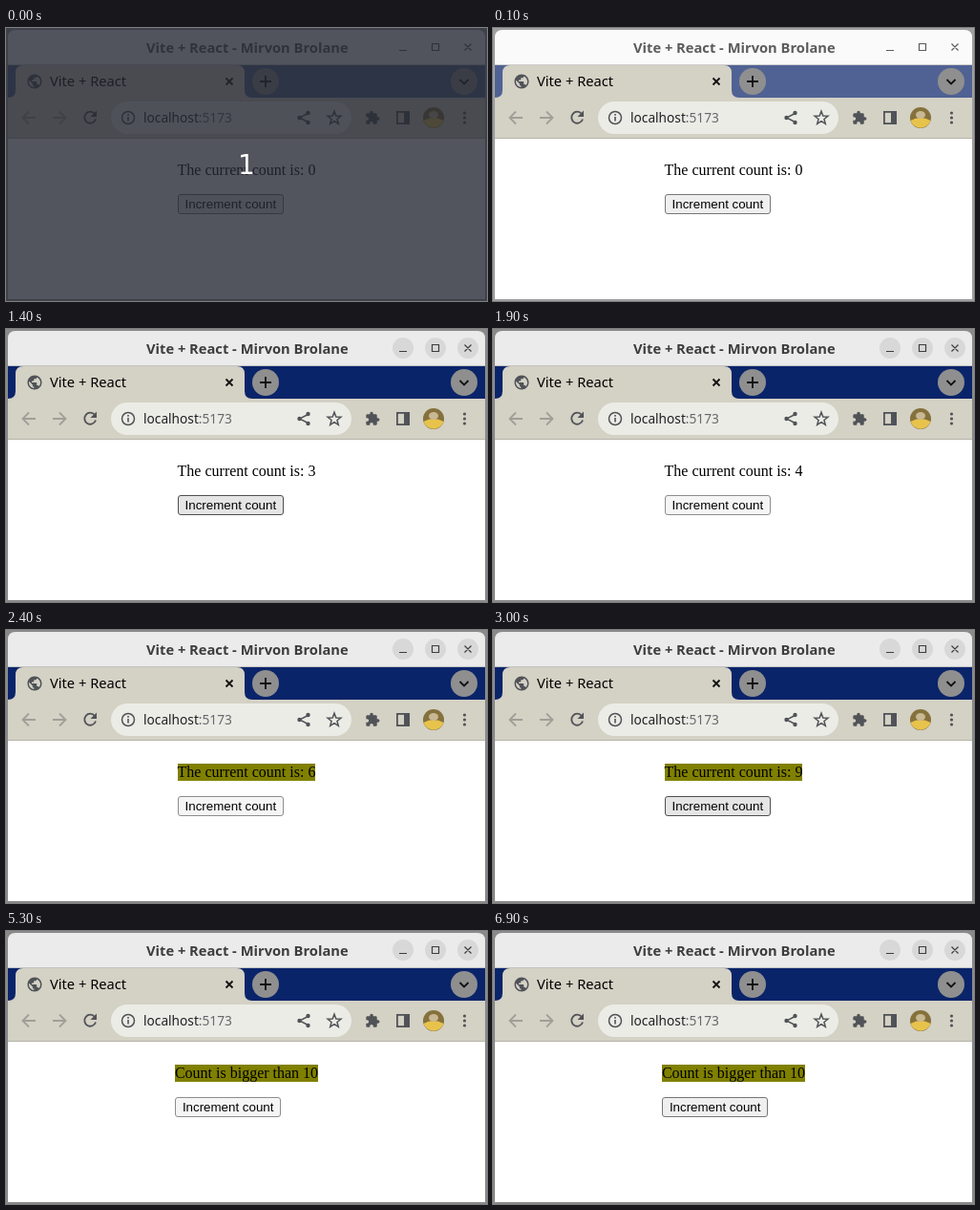
An HTML page that plays this animation: 504 px wide and 286 px high, repeating every 7500 ms.

```html
<!DOCTYPE html>
<html lang="en">
<head>
<meta charset="utf-8">
<title>Counter</title>
<style>
html, body { margin: 0; width: 100%; height: 100%; overflow: hidden; }
#stage { position: relative; width: 504px; height: 286px; overflow: hidden; background: var(--edge); }
svg { position: absolute; inset: 0; }
.ui { font-family: "Noto Sans", "Open Sans", sans-serif; }
.line { fill: none; stroke: #505357; stroke-width: 1.8; }
.ink { fill: #505357; }
.faint { stroke: #a09f98; }
.black { stroke: #111; }
#bar { fill: var(--bar); }
#title { fill: var(--title); font-weight: 700; font-size: 14.7px; }
#discs { fill: #d8d8d8; opacity: var(--focus); }
#marks { fill: none; stroke: var(--title); stroke-width: 1.2; }
#strip { fill: var(--strip); }
#page { position: absolute; left: 2px; top: 140px; width: 500px; display: flex; justify-content: center; }
#msg { margin: 0 0 16px; font: 16px/18px "Liberation Serif", "Times New Roman", serif; color: #000; white-space: nowrap; }
#msg.high { background: #808000; }
#btn { box-sizing: border-box; height: 21px; padding: 2px 7px; border: 1px solid #767676; border-radius: 3px;
  background: #efefef; color: #000; font: 13.333px/15px "Liberation Sans", Arial, sans-serif; white-space: nowrap;
  display: inline-block; }
#btn.hover { background: #e5e5e5; border-color: #4f4f4f; }
#btn.down { background: #f5f5f5; border-color: #8d8d8d; }
#shade { position: absolute; inset: 0; background: rgba(36, 40, 50, .79); color: #fff; text-align: center;
  font: 28px/32px "DejaVu Sans", sans-serif; padding-top: 128px; }
</style>
</head>
<body>
<div id="stage">
  <svg class="ui" width="504" height="286" viewBox="0 0 504 286">
    <path id="bar" d="M2 39V10Q2 2 10 2H494Q502 2 502 10V39Z"/>
    <text id="title" x="147" y="25.5">Vite + React - Mirvon Brolane</text>
    <g id="discs"><circle cx="416" cy="20" r="11"/><circle cx="450" cy="20" r="11"/><circle cx="484" cy="20" r="11"/></g>
    <path id="marks" d="M412 23.5H420M446.500 16.500H453.500V23.500H446.500ZM480.500 16.500L487.500 23.500M487.500 16.500L480.500 23.500"/>

    <rect id="strip" x="2" y="39" width="500" height="34"/>
    <path d="M2 38.500H502" stroke="#000" stroke-opacity=".18"/>
    <path fill="#d4d1c5" d="M2 73Q10 73 10 65V47Q10 39 18 39H242Q250 39 250 47V65Q250 73 258 73H502V116H2Z"/>
    <path d="M2 115.500H502" stroke="#b6b4aa"/>
    <path class="ink" transform="translate(21 47) scale(.75)" d="M12 2C6.480 2 2 6.480 2 12s4.480 10 10 10 10-4.480 10-10S17.520 2 12 2zm-1 17.930c-3.950-.490-7-3.850-7-7.930 0-.620.080-1.210.210-1.790L9 15v1c0 1.100.900 2 2 2v1.930zm6.900-2.540c-.260-.810-1-1.390-1.900-1.390h-1v-3c0-.550-.450-1-1-1H8v-2h2c.550 0 1-.450 1-1V7h2c1.100 0 2-.900 2-2v-.410c2.930 1.190 5 4.060 5 7.410 0 2.080-.800 3.970-2.100 5.390z"/>
    <text x="46" y="61" font-size="14.67">Vite + React</text>
    <path class="line black" d="M230.500 52.500L237.500 59.500M237.500 52.500L230.500 59.500"/>
    <g fill="#8f8f8f"><circle cx="272" cy="56" r="14"/><circle cx="480" cy="56" r="14"/></g>
    <path class="line black" d="M266 56H278M272 50V62M475.500 54L480 58.500L484.500 54"/>

    <path class="line faint" d="M31 94H18M24 87.500L17.500 94L24 100.500M49 94H62M56 87.500L62.500 94L56 100.500"/>
    <path class="line" d="M93 90A6 6 0 1 0 94 95.500"/>
    <path class="ink" d="M95 86.500V93H88.500Z"/>
    <rect x="110" y="77" width="252" height="34" rx="17" fill="#ecece6"/>
    <circle class="line" cx="128" cy="94" r="6.500" style="stroke-width:1.500"/>
    <path class="line" d="M128 93V97.500M128 90V91.700" style="stroke-width:1.600"/>
    <text x="144" y="99" font-size="13.7" fill="#202124">localhost<tspan fill="#65686c">:5173</tspan></text>
    <path class="line" d="M316.500 89.500L307.500 94L316.500 98.500" style="stroke-width:1.400"/>
    <g class="ink"><circle cx="316.500" cy="89" r="2.200"/><circle cx="307.500" cy="94" r="2.200"/><circle cx="316.500" cy="99" r="2.200"/></g>
    <path id="star" class="line" style="stroke-width:1.500"/>
    <path class="ink" transform="translate(376 86) scale(.67)" d="M20.500 11H19V7c0-1.100-.900-2-2-2h-4V3.500C13 2.120 11.880 1 10.500 1S8 2.120 8 3.500V5H4c-1.100 0-1.990.900-1.990 2v3.800H3.500c1.490 0 2.700 1.210 2.700 2.700s-1.210 2.700-2.700 2.700H2V20c0 1.100.900 2 2 2h3.800v-1.500c0-1.490 1.210-2.700 2.700-2.700s2.700 1.210 2.700 2.700V22H17c1.100 0 2-.900 2-2v-4h1.500c1.380 0 2.500-1.120 2.500-2.500S21.880 11 20.500 11z"/>
    <rect class="line" x="409.900" y="87.900" width="12.200" height="12.200"/>
    <path class="ink" d="M417 88H423V100H417Z"/>
    <circle cx="448" cy="94" r="11" fill="#85713c"/>
    <path fill="#e8c34c" d="M437.500 97Q448 91 458.500 97A11 11 0 0 1 437.500 97Z"/>
    <ellipse cx="448" cy="91" rx="5" ry="4" fill="#c9b894"/>
    <g class="ink"><circle cx="480.500" cy="89" r="1.600"/><circle cx="480.500" cy="94" r="1.600"/><circle cx="480.500" cy="99" r="1.600"/></g>
    <rect x="2" y="116" width="500" height="168" fill="#fff"/>
  </svg>
  <div id="page"><div><p id="msg"></p><div id="btn">Increment count</div></div></div>
  <div id="shade">1</div>
</div>
<script>
const LOOP = 7500, PRESS = 100, HOVER = [500, 6900];
// Release time of each click; every release adds one to the count.
const clicks = [900, 1200, 1400, 1600, 2000, 2200, 2500, 2800, 3000, 3400, 3800, 4100, 5100, 5400];
const $ = id => document.getElementById(id);
const stage = $('stage'), msg = $('msg'), btn = $('btn'), shade = $('shade');

const points = Array.from({ length: 10 }, (_, i) => {
  const a = Math.PI * (i / 5 - .5), r = i % 2 ? 3.1 : 7.3;
  return `${344 + r * Math.cos(a)} ${94.5 + r * Math.sin(a)}`;
});
$('star').setAttribute('d', `M${points.join('L')}Z`);

const mix = (a, b, k) => `rgb(${a.map((v, i) => Math.round(v + (b[i] - v) * k))})`;
const grey = (a, b, k) => mix([a, a, a], [b, b, b], k);

function draw(t) {
  const count = clicks.filter(c => t >= c).length;
  const down = clicks.some(c => t >= c - PRESS && t < c);
  const hover = t >= HOVER[0] && t < HOVER[1];
  const focus = t < 800 ? 0 : t < 900 ? .5 : 1;
  const set = (name, value) => stage.style.setProperty('--' + name, value);

  set('focus', focus);
  set('edge', grey(160, 138, focus));
  set('bar', grey(250, 235, focus));
  set('title', grey(92, 61, focus));
  set('strip', mix([80, 98, 148], [10, 36, 106], focus ? 1 : 0));

  const text = count > 10 ? 'Count is bigger than 10' : `The current count is: ${count}`;
  if (msg.textContent !== text) msg.textContent = text;
  msg.className = count > 5 ? 'high' : '';
  btn.className = down ? 'down' : hover ? 'hover' : '';
  shade.hidden = t >= 100;
  shade.style.display = t < 100 ? 'block' : 'none';
}

const start = performance.now();
function tick() {
  draw((performance.now() - start) % LOOP);
  requestAnimationFrame(tick);
}
draw(0);
requestAnimationFrame(tick);
</script>
</body>
</html>
```
